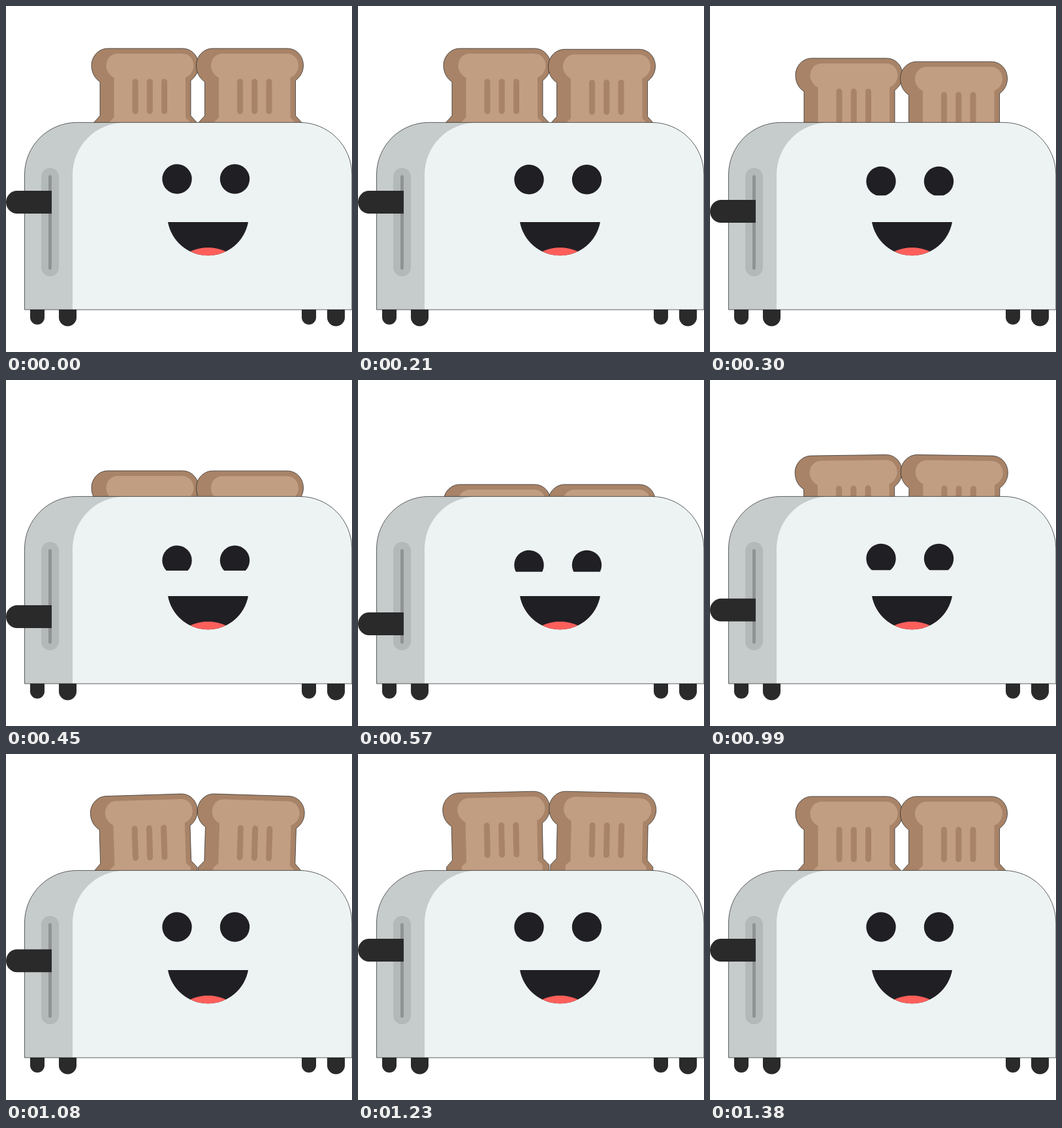
These frames come from a looping animation (530x530 px, 1.71 s). An HTML page:

```html
<!DOCTYPE html>
<html lang="en">
<head>
<meta charset="utf-8">
<title>Toaster</title>
<style>
  html, body { margin: 0; width: 100%; height: 100%; overflow: hidden; background: #fff; }
  svg { display: block; width: 100vw; height: 100vh; }
  .crust { fill: #a88367; }
  .edge { stroke: #222; stroke-width: .7; }
  .crumb { fill: #c19e82; }
  .cuts { stroke: #a88367; stroke-width: 9; stroke-linecap: round; }
  .dark { fill: #2a2a2a; }
  .ink { fill: #201f24; }
</style>
</head>
<body>
<svg viewBox="0 0 530 530">
  <defs>
    <g id="toast">
      <path class="crust edge" d="M156 65H270C285 65 295 77 295 91C295 101 290 109 283 114V168L292 178V200H135V178L144 168V116C136 111 131 102 131 91C131 77 142 65 156 65Z"/>
      <path class="crumb" d="M171 73H270C280 73 287.500 81 287.500 91.500C287.500 99 282 107 275 109.500V171L282 178V200H158V178L165.500 171V110C158 106 153.500 99 153.500 91.500C153.500 81 161 73 171 73Z"/>
      <path class="cuts" d="M198 116V161M220.250 116V161M242.500 116V161"/>
    </g>
    <clipPath id="lid"><rect id="lidBox" x="230" y="200" width="160" height="90"/></clipPath>
    <clipPath id="mouth"><path d="M248 331H371A62.500 62.500 0 0 1 248 331Z"/></clipPath>
  </defs>

  <g id="left"><use href="#toast"/></g>
  <g id="right"><use href="#toast" x="160.500"/></g>

  <g class="dark">
    <path d="M37 465H59V477A11 11 0 0 1 37 477Z"/>
    <path d="M81 465H108V477A13.500 13.500 0 0 1 81 477Z"/>
    <path d="M453 465H475V477A11 11 0 0 1 453 477Z"/>
    <path d="M492 465H519V477A13.500 13.500 0 0 1 492 477Z"/>
  </g>

  <path fill="#c6cccb" d="M28.500 465V258A80 80 0 0 1 108.500 178.400H450A80 80 0 0 1 530 258V465Z"/>
  <path fill="#edf3f3" d="M102 465V258A80 80 0 0 1 182 178.400H450A80 80 0 0 1 530 258V465Z"/>
  <path class="edge" fill="none" d="M28.500 465.200V258A80 80 0 0 1 108.500 178.400H450A80 80 0 0 1 529.800 258V465.200Z"/>

  <rect x="54" y="248" width="27" height="166" rx="13.500" fill="#b3b8b8"/>
  <rect x="65" y="259" width="5" height="145" rx="2.500" fill="#8f9393"/>
  <path id="lever" class="dark" d="M70 283V318H17A17 17.500 0 0 1 17 283Z"/>

  <g class="ink" clip-path="url(#lid)">
    <g id="eyes">
      <circle cx="262" cy="265" r="22.700"/>
      <circle cx="350.500" cy="265" r="22.700"/>
    </g>
  </g>
  <g clip-path="url(#mouth)">
    <rect class="ink" x="240" y="325" width="140" height="65"/>
    <circle cx="309.500" cy="434" r="64" fill="#ff5f5b"/>
  </g>
</svg>
<script>
  const LOOP = 1710, STEP = 30;
  const SINK = 95, HOP = 10, TILT = 1.9;
  const el = id => document.getElementById(id);
  const [left, right, lever, eyes, lidBox] = ['left', 'right', 'lever', 'eyes', 'lidBox'].map(el);

  const span = (t, a, b) => Math.min(1, Math.max(0, (t - a) / (b - a)));
  const sine = u => (1 - Math.cos(Math.PI * u)) / 2;
  const quad = u => u < .5 ? 2 * u * u : 1 - 2 * (1 - u) ** 2;
  const move = (node, y) => node.setAttribute('transform', `translate(0 ${y.toFixed(3)})`);

  function poseToast(node, t, start, end, cx, side) {
    const pop = quad(span(t, 870, 1130));
    const settle = 1 - sine(span(t, 1130, 1380));
    const y = t < 870
      ? SINK * sine(span(t, start, end))
      : t < 1130 ? SINK - (SINK + HOP) * pop : -HOP * settle;
    const tilt = side * TILT * pop * settle;
    node.setAttribute('transform',
      `translate(0 ${y.toFixed(3)}) rotate(${tilt.toFixed(3)} ${cx} 147)`);
  }

  function draw(t) {
    poseToast(left, t, 209, 559, 213, -1);
    poseToast(right, t, 181, 571, 373.5, 1);
    move(lever, 73 * (sine(span(t, 205, 533)) - quad(span(t, 870, 1185))));
    const smile = sine(span(t, 130, 870)) - sine(span(t, 870, 1060));
    move(eyes, 28.5 * smile);
    lidBox.setAttribute('height', 89.3 + 6.7 * smile);
  }

  const begin = performance.now();
  function tick() {
    const t = (performance.now() - begin) % LOOP;
    draw(Math.floor(t / STEP) * STEP);
    requestAnimationFrame(tick);
  }
  tick();
</script>
</body>
</html>
```
